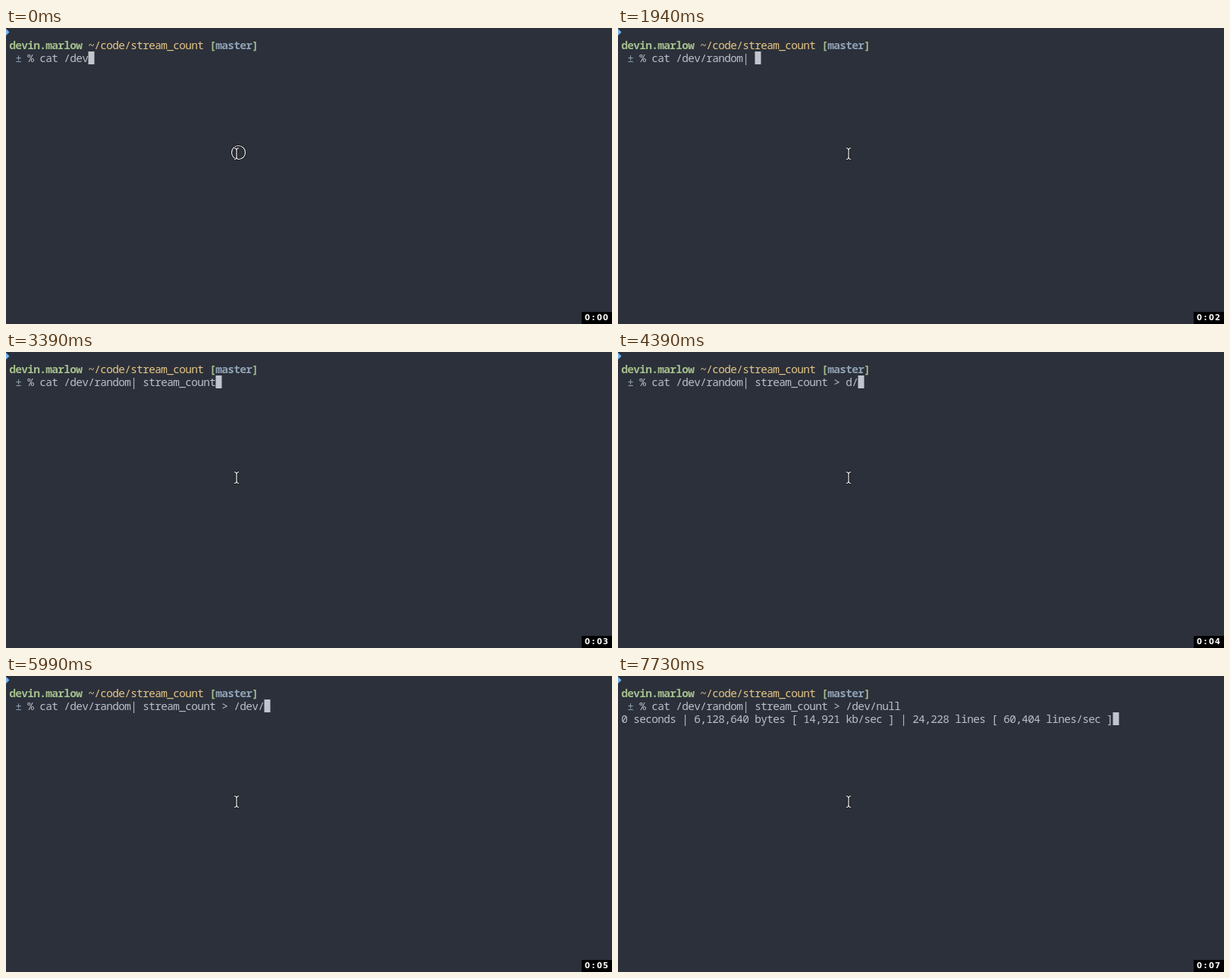
An HTML page with a canvas for the animation above (8000 ms loop, 799 by 391 pixels).

```html
<!DOCTYPE html>
<html lang="en">
<head>
<meta charset="utf-8">
<title>Terminal session</title>
<style>
  html, body { margin: 0; width: 100%; height: 100%; overflow: hidden; background: #2c303a; }
  canvas { display: block; }
</style>
</head>
<body>
<canvas id="stage" width="799" height="391"></canvas>
<script>
const ctx = document.getElementById('stage').getContext('2d');
const LOOP = 8000, CELL = 8, ROW = 17, LEFT = 4.5, TOP = 14, BASELINE = 13.5;
const BG = '#2c303a', FG = '#b9bec8', GREEN = '#a3be8c', YELLOW = '#e5c685', BLUE = '#8fa1b3';
const MONO = '14.5px "Noto Sans Mono", "DejaVu Sans Mono", monospace';

// Keystrokes come in bursts, evenly spread from start to end; \b deletes a character.
const bursts = [
  [150, 890, ['/', 'r', 'an', 'd', 'om', ' ']],
  [1640, 1640, ['\b|']],
  [1940, 2540, [' ', 's', 'tr', 'e', 'am']],
  [2840, 3390, ['_', 'c', 'o', 'un', 't']],
  [3840, 4390, [' ', '>', ' ', 'd', '/']],
  [4840, 5540, ['\b', '\b', '/', 'd', 'e', 'v']],
  [5990, 5990, ['/']],
  [6280, 6840, ['n', 'u', 'l', 'l', '\n']]
];
const keys = bursts.flatMap(([start, end, parts]) => parts.map((text, i) =>
  ({ text, time: Math.round(start + (end - start) * i / Math.max(1, parts.length - 1)) })));
const ticks = [890, 1940, 2840, 3840, 4840, 6140, 7290];
const reports = [7290, 7440, 7590, 7730];

const passed = (times, t) => times.filter(time => time <= t).length;

function command(t) {
  let line = 'cat /dev';
  for (const key of keys) {
    if (key.time > t) break;
    for (const c of key.text) line = c === '\b' ? line.slice(0, -1) : line + c;
  }
  return line;
}

// The cursor waits one cell after the pipe, where the deleted space was.
const cursorGap = t => t >= 1640 && t < 1940 ? 0 : 0;

function report(t) {
  const part = passed(reports, t) / reports.length;
  if (!part) return '';
  const num = n => Math.round(n).toLocaleString('en-US');
  return `0 seconds | ${num(6128640 * part)} bytes [ 14,921 kb/sec ] | ` +
    `${num(24228 * part)} lines [ 60,404 lines/sec ]`;
}

// Draws text on the character grid and returns the next column.
function print(text, col, row, color, bold = '') {
  ctx.font = bold + ' ' + MONO;
  ctx.fillStyle = color;
  for (const c of text) ctx.fillText(c, LEFT + CELL * (col++ + 0.5), TOP + ROW * row + BASELINE);
  return col;
}

function outlined(path) {
  for (const [color, width] of [['#15171c', 3], ['#f4f4f4', 1.2]]) {
    ctx.strokeStyle = color;
    ctx.lineWidth = width;
    ctx.stroke(path);
  }
}

const beam = new Path2D('M301 158.5 Q303.5 158.5 304 161 V171 Q303.5 173.5 301 173.5 ' +
  'M307 158.5 Q304.5 158.5 304 161 M304 171 Q304.5 173.5 307 173.5');
const ring = new Path2D();
ring.arc(306.5, 164.5, 9, 0, Math.PI * 2);

function draw(t) {
  ctx.fillStyle = BG;
  ctx.fillRect(0, 0, 799, 391);
  ctx.textAlign = 'center';

  ctx.fillStyle = '#74b7f8';
  ctx.fill(new Path2D('M0 1 L4.5 5.5 L0 10 Z'));

  let col = print('devin.marlow', 0, 0, GREEN, 'bold');
  col = print(' ~/code/stream_count ', col, 0, YELLOW);
  col = print('[', col, 0, GREEN, 'bold');
  col = print('master', col, 0, BLUE, 'bold');
  print(']', col, 0, GREEN, 'bold');

  const line = command(t), running = line.endsWith('\n');
  print('±', 1, 1, BLUE);
  print('% ' + line.trimEnd(), 3, 1, FG);
  col = running ? print(report(t), 0, 2, FG) : 5 + line.length;
  ctx.fillStyle = '#c0c5ce';
  ctx.fillRect(LEFT + CELL * col, TOP + ROW * (running ? 2 : 1), CELL, ROW);

  if (t < 150) outlined(ring);
  outlined(beam);

  ctx.fillStyle = '#000';
  ctx.fillRect(759, 375, 40, 16);
  ctx.fillStyle = '#fff';
  ctx.font = 'bold 10px "DejaVu Sans", sans-serif';
  [...'0:0' + passed(ticks, t)].forEach((c, i) => ctx.fillText(c, 766.5 + 8 * i, 386));
}

let start;
function frame(now) {
  start ??= now;
  draw((now - start) % LOOP);
  requestAnimationFrame(frame);
}
draw(0);
requestAnimationFrame(frame);
</script>
</body>
</html>
```
